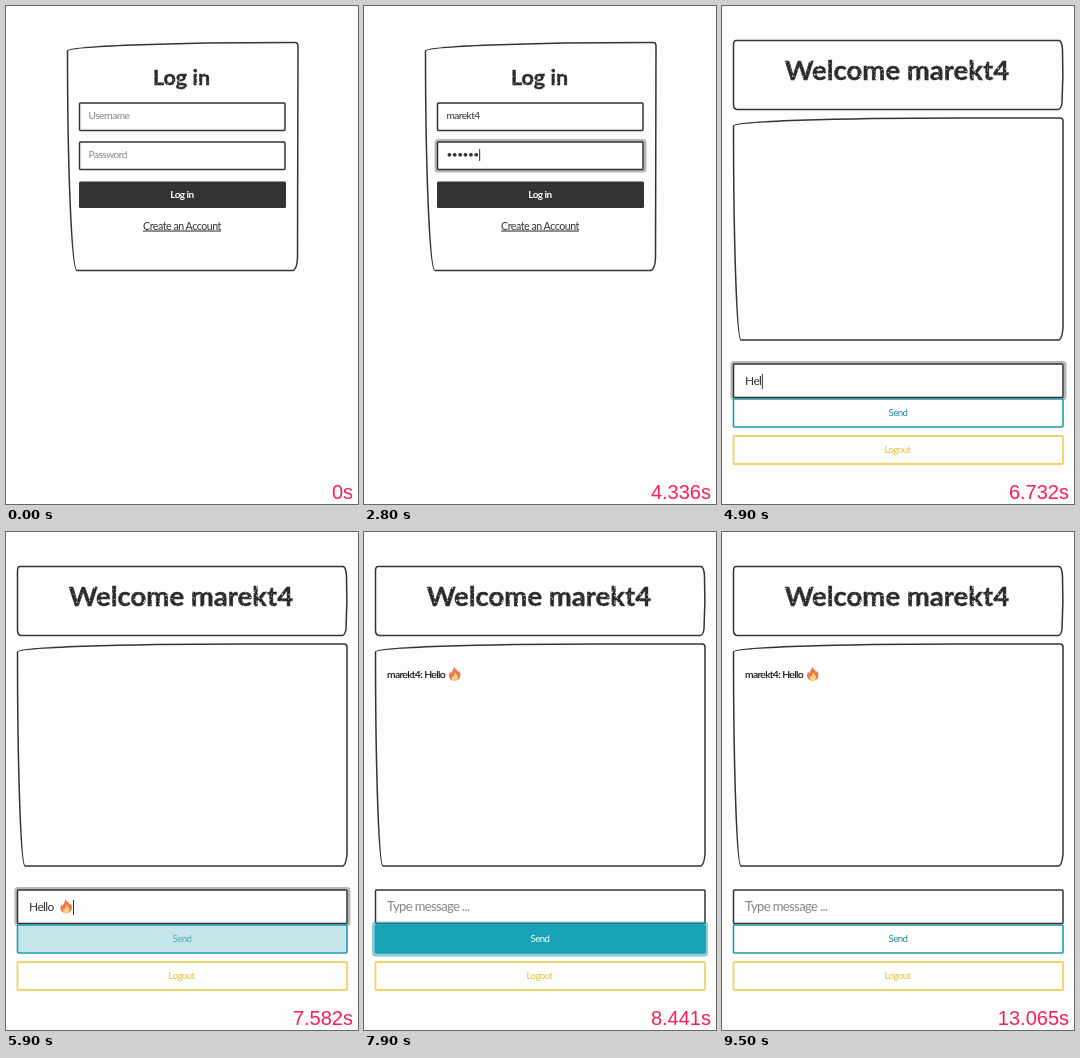
These frames come from a looping animation (352 by 498 pixels, 9600 ms). An HTML page:

```html
<!DOCTYPE html>
<html lang="en">
<head>
<meta charset="utf-8">
<title>Login and chat</title>
<style>
  html, body { margin: 0; width: 100%; height: 100%; overflow: hidden; background: #fdfdfc; }
  svg { display: block; width: 352px; height: 498px; }
  text { font-family: Lato, "Open Sans", sans-serif; fill: #333; white-space: pre; }
  .title { font-weight: 700; text-anchor: middle; fill: #2b2b2b; stroke: #2b2b2b; stroke-width: .4; filter: url(#rough); }
  .line { fill: none; stroke: #333; stroke-width: 1.5; stroke-linejoin: round; }
  .glow { fill: none; stroke: #333; stroke-opacity: .35; stroke-width: 3; }
  .field { font-size: 10.2px; letter-spacing: -.55px; }
  .entry { font-size: 12px; letter-spacing: -.6px; }
  .hint { fill: #868686; }
  .entry.hint { font-size: 13px; letter-spacing: -.6px; }
  .btn { font-size: 9.6px; letter-spacing: -.5px; text-anchor: middle; }
  .link { font-size: 10.6px; letter-spacing: -.45px; text-anchor: middle; text-decoration: underline; }
  .msg { font-size: 10.4px; letter-spacing: -.65px; fill: #111; stroke: #111; stroke-width: .15; }
  .caret { stroke: #333; stroke-width: 1; }
  #clock { font: 20px "Liberation Sans", Arial, sans-serif; fill: #f5205a; text-anchor: end; }
</style>
</head>
<body>
<svg viewBox="0 0 352 498">
  <defs>
    <filter id="rough" x="-5%" y="-20%" width="110%" height="140%">
      <feTurbulence type="fractalNoise" baseFrequency=".4 .6" numOctaves="2" seed="4"/>
      <feColorMatrix values="0 0 0 0 0  0 0 0 0 0  0 0 0 0 0  0 0 0 -5 4.1"/>
      <feComposite in="SourceGraphic" operator="in"/>
    </filter>
    <g id="flame" transform="translate(.8 .8) scale(.9)">
      <path fill="#e87850" d="M5.5 0C6.5 3 10 4 10.5 7L11.5 5C14 9 13.5 16 7 16C0 16-1 10 1.5 6L3 8C3 5 6 4 5.5 0Z"/>
      <path fill="#f8cf7a" d="M7 6C7.5 9 10.8 10 10.3 13C9.8 15.400 8 16 6.700 16C4 16 2.500 14 3.400 11L5 12C5 10 7 9 7 6Z"/>
    </g>
  </defs>

  <g id="login">
    <path class="line" d="M61.5 45A225 8.5 0 0 1 286.500 36.500H289Q292 36.500 292 40L291.500 252Q291 263 287 264.500H71A9.500 219.500 0 0 1 61.500 45Z"/>
    <text class="title" x="175.500" y="79" font-size="21.500">Log in</text>
    <rect class="glow" id="userGlow" x="72" y="95.500" width="209" height="30.500" rx="2"/>
    <rect class="line" x="73.500" y="97" width="205.500" height="27.500" rx="1"/>
    <text class="field" id="user" x="82.500" y="113"></text>
    <line class="caret" id="userCaret" y1="104" y2="116"/>
    <rect class="glow" id="passGlow" x="72" y="134.500" width="209" height="30.500" rx="2"/>
    <rect class="line" x="73.500" y="136" width="205.500" height="27.500" rx="1"/>
    <text class="field" id="pass" x="82.500" y="152"></text>
    <line class="caret" id="passCaret" y1="143" y2="155"/>
    <rect class="glow" id="enterGlow" x="71.500" y="174" width="210" height="29.500" rx="2"/>
    <rect id="enter" x="73" y="175.500" width="207" height="26.500" rx="1.500"/>
    <text class="btn" x="176" y="191.500" style="fill:#fff;font-size:10px;font-weight:700">Log in</text>
    <text class="link" x="176" y="223.500">Create an Account</text>
  </g>

  <g id="chat">
    <path class="line" d="M14 34.500H337Q340 35 340.500 44Q341.500 70 340 97Q339 103.500 336 103.500H15Q11.500 103 11.500 98V39Q11.500 34.500 14 34.500Z"/>
    <text class="title" id="welcome" x="175" y="74" font-size="27.500"></text>
    <path class="line" d="M11.500 120A225 8 0 0 1 236.500 112H338Q341 112 341 115V322Q340 333 337 334H19A7.500 214 0 0 1 11.500 120Z"/>
    <g id="posted">
      <text class="msg" id="message" x="23" y="146"></text>
      <use href="#flame" x="84" y="133.500"/>
    </g>
    <rect class="glow" id="entryGlow" x="10" y="356.500" width="333" height="36" rx="2"/>
    <rect class="line" x="11.500" y="358" width="329.500" height="33.500" rx="1"/>
    <text id="entry" x="23" y="379"></text>
    <use href="#flame" id="entryFlame" x="53.500" y="366"/>
    <line class="caret" id="entryCaret" y1="368" y2="383"/>
    <rect class="glow" id="sendGlow" x="9.500" y="391" width="333" height="32" rx="2" style="stroke:#17a2b8;stroke-opacity:.5"/>
    <rect id="send" x="11.500" y="393" width="329.500" height="28" rx="1" stroke="#1c9cb5" stroke-width="1.600"/>
    <text class="btn" id="sendText" x="176" y="410">Send</text>
    <rect x="11.500" y="430" width="329.500" height="28" rx="1" fill="none" stroke="#efd269" stroke-width="1.800"/>
    <text class="btn" x="175.500" y="447" style="fill:#e2c03c">Logout</text>
  </g>
  <text id="clock" x="347" y="493"></text>
</svg>

<script>
const LOOP = 9600, STEP = 100, NAME = 'marekt4';
const CLOCK = [[0, 0], [100, .9], [1600, 2.649], [3900, 5.882], [5900, 7.582],
  [7100, 8.032], [8600, 8.799], [9400, 9.2], [9500, 13.065]];
const $ = id => document.getElementById(id);
const ramp = (t, from, to) => Math.min(1, Math.max(0, (t - from) / (to - from)));
const pulse = (t, a, b, c, d) => ramp(t, a, b) - ramp(t, c, d);
const fade = (id, v) => $(id).style.opacity = v;
const show = (id, on) => $(id).style.display = on ? '' : 'none';
const mix = (a, b, k) => `rgb(${a.map((v, i) => Math.round(v + (b[i] - v) * k))})`;
const typed = (word, t, start, gap) =>
  word.slice(0, Math.max(0, Math.floor((t - start) / gap) + 1));

function clockAt(t) {
  const i = CLOCK.findIndex(([at]) => at >= t);
  if (i < 1) return 0;
  const [t0, v0] = CLOCK[i - 1], [t1, v1] = CLOCK[i];
  return v0 + (v1 - v0) * (t - t0) / (t1 - t0);
}

function fillField(id, value, hint, cls, focused, flame) {
  const el = $(id);
  el.textContent = value || hint;
  el.setAttribute('class', value ? cls : cls + ' hint');
  show(id + 'Caret', focused);
  if (!focused) return;
  const width = value ? el.getComputedTextLength() + 1 : .5;
  const x = flame ? 67.5 : +el.getAttribute('x') + width;
  $(id + 'Caret').setAttribute('x1', x);
  $(id + 'Caret').setAttribute('x2', x);
}

function drawLogin(t) {
  fillField('user', typed(NAME, t, 1100, 100), 'Username', 'field', t >= 400 && t < 1900);
  fillField('pass', typed('••••••••', t, 2300, 100), 'Password', 'field', t >= 1900 && t < 3200);
  fade('userGlow', pulse(t, 300, 700, 1800, 2200));
  fade('passGlow', pulse(t, 1800, 2200, 3100, 3400));
  fade('enterGlow', ramp(t, 3100, 3400));
  $('enter').style.fill = mix([51, 51, 51], [32, 32, 32], ramp(t, 3000, 3300));
}

function drawChat(t) {
  const sent = t >= 7500, flame = t >= 5600 && !sent;
  fillField('entry', sent ? '' : typed('Hello ', t, 4500, 180), 'Type message ...', 'entry',
    t < 6500, flame);
  show('entryFlame', flame);
  show('posted', sent);
  fade('entryGlow', pulse(t, 3900, 4300, 6500, 6900));
  fade('sendGlow', pulse(t, 7100, 7500, 8800, 9200));
  const hover = pulse(t, 5800, 6200, 7900, 8300);
  $('send').style.fill = mix([253, 253, 252], [23, 162, 184], hover);
  $('sendText').style.fill = mix([28, 140, 165], [255, 255, 255], hover);
}

function draw(t) {
  const chat = t >= 3500;
  show('login', !chat);
  show('chat', chat);
  (chat ? drawChat : drawLogin)(t);
  $('clock').textContent = (t ? clockAt(t).toFixed(3) : '0') + 's';
}

$('welcome').textContent = 'Welcome ' + NAME;
$('message').textContent = NAME + ': Hello';
const begin = performance.now();
function tick() {
  const t = (performance.now() - begin) % LOOP;
  draw(Math.floor(t / STEP) * STEP);
  requestAnimationFrame(tick);
}
tick();
</script>
</body>
</html>
```
